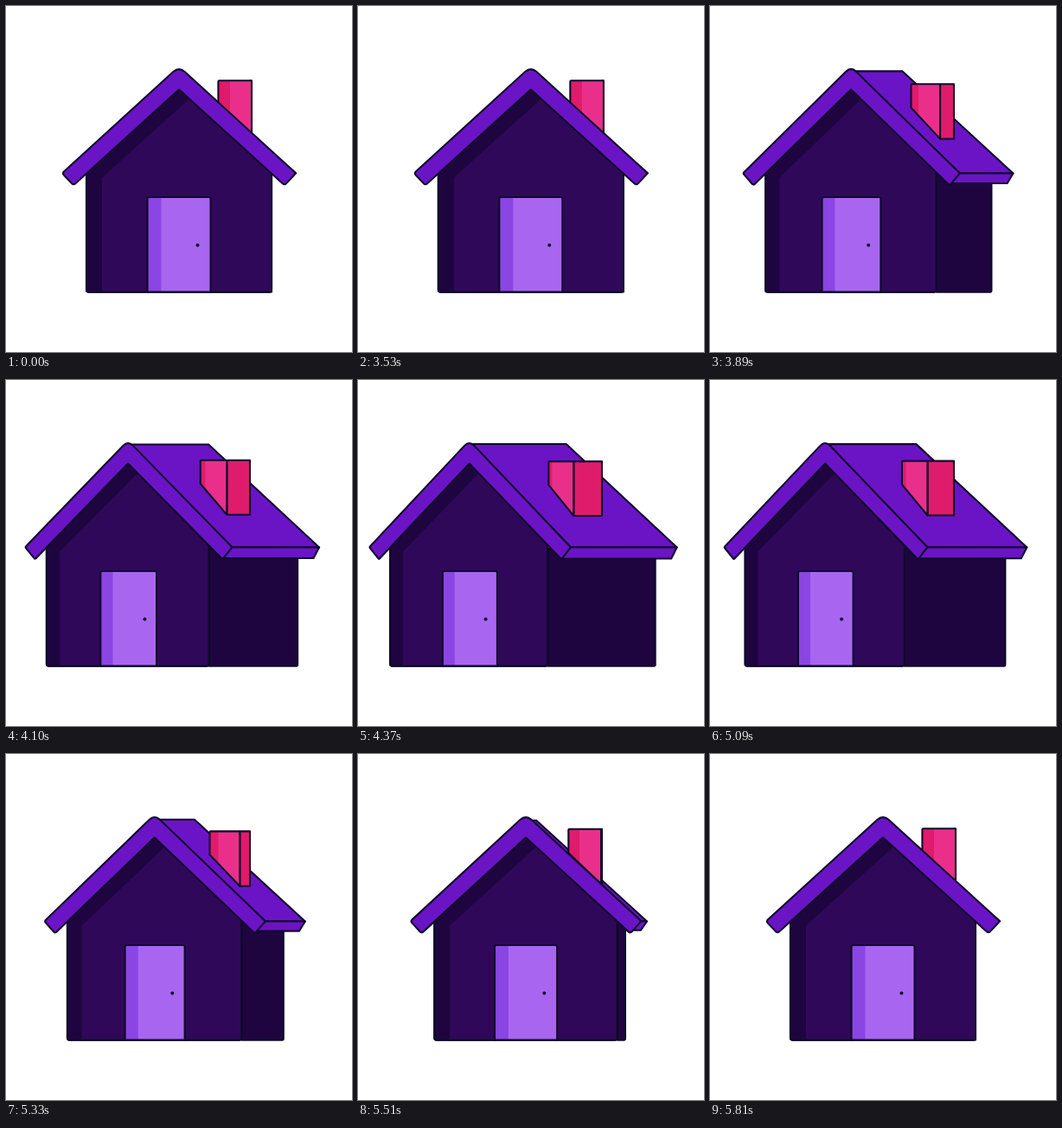
An HTML page for the animation above (5840 ms loop, 400x400 px).

```html
<!DOCTYPE html>
<html lang="en">
<head>
<meta charset="utf-8">
<title>House</title>
<style>
  html, body { margin: 0; width: 100%; height: 100%; overflow: hidden; background: #fff; }
  svg { display: block; width: 100vw; height: 100vh; }
  .line { stroke: #100a2c; stroke-width: 2.1; stroke-linejoin: round; }
</style>
</head>
<body>
<svg id="stage" viewBox="0 0 400 400"></svg>
<script>
const LOOP = 5840, OPEN = 3500, CLOSE = 4670, TURN = 1170;
const INK = '#100a2c', SHADE = '#1f0540', WALL = '#30085a', ROOF = '#6b14c6';
const DOOR = '#a866f0', DOOR_SHADE = '#8b45e3', BRICK = '#ea2f8b', BRICK_SHADE = '#df1c6b';
const stage = document.getElementById('stage');

function add(tag, attrs) {
  const el = document.createElementNS('http://www.w3.org/2000/svg', tag);
  for (const name in attrs) el.setAttribute(name, attrs[name]);
  return stage.appendChild(el);
}
const flat = fill => add('path', { fill });
const inked = fill => add('path', { fill, class: 'line' });

// Painted from back to front
const sideWall = inked(SHADE);
const wall = inked(SHADE);
const face = flat(WALL);
const wallLine = inked('none');
const door = flat(DOOR);
const doorShade = flat(DOOR_SHADE);
const doorLine = inked('none');
const knob = add('circle', { r: 2, cy: 276.5, fill: INK });
const slope = inked(ROOF);
const fascia = inked(ROOF);
const chimneySide = inked(BRICK_SHADE);
const chimney = flat(BRICK);
const chimneyShade = flat(BRICK_SHADE);
const chimneyLine = inked('none');
const gable = inked(ROOF);

// The point at distance r from a on the way to b
function toward([ax, ay], [bx, by], r) {
  const k = r / (Math.hypot(bx - ax, by - ay) || 1);
  return [ax + (bx - ax) * k, ay + (by - ay) * k];
}

// Closed polygon; each point is [x, y] or [x, y, corner size]
function draw(el, ...points) {
  const n = points.length;
  const parts = points.map((p, i) => {
    const [x, y, r = 0] = p;
    const a = toward(p, points[(i + n - 1) % n], r);
    const b = toward(p, points[(i + 1) % n], r);
    return `${a}Q${x},${y} ${b}`;
  });
  el.setAttribute('d', 'M' + parts.join('L') + 'Z');
}

// Timing curve with handles (a, 0) and (b, 1)
function ease(u, a, b) {
  let lo = 0, hi = 1;
  for (let i = 0; i < 30; i++) {
    const s = (lo + hi) / 2, r = 1 - s;
    if (3 * a * s * r * r + 3 * b * s * s * r + s * s * s < u) lo = s; else hi = s;
  }
  return lo * lo * (3 - 2 * lo);
}

function turnAt(ms) {
  if (ms < OPEN) return 0;
  if (ms < CLOSE) return ease((ms - OPEN) / TURN, 0.325, 0.24);
  return 1 - ease((ms - CLOSE) / TURN, 0.85, 0.255);
}

function render(ms) {
  const turn = turnAt(ms);
  const mix = (from, to) => from + (to - from) * turn;

  const left = mix(93, 34.5), right = mix(307, 215), back = mix(305.8, 345.5);
  const apex = mix(200, 125.2), base = 330.6;
  draw(sideWall, [right, 195], [back, 195], [back, base, 1], [right, base]);
  const outline = [[left, base, 2], [left, 188], [apex, 92], [right, 188], [right, base, 2]];
  draw(wall, ...outline);
  draw(wallLine, ...outline);
  const strip = mix(111, 49);
  draw(face, [strip, base], [strip, 198.6], [mix(212, 136.6), 107.6], [right, 193], [right, base, 2]);

  const doorL = mix(163.5, 94.7), doorR = mix(236.5, 157.3), doorM = mix(179.5, 108.4);
  const doorBox = (l, r, round) => [[l, 221, 2], [r, 221, round], [r, base], [l, base]];
  draw(door, ...doorBox(doorL, doorR, 2));
  draw(doorShade, ...doorBox(doorL, doorM, 0));
  draw(doorLine, ...doorBox(doorL, doorR, 2));
  knob.setAttribute('cx', mix(221.5, 144));

  const eave = [mix(335.1, 241.6), 193.3], tip = [mix(322, 231), 207.3];
  const eaveBack = [mix(330.9, 370.5), 193.5], ridgeY = mix(77, 73.8);
  const fasciaY = mix(203.5, 206.6);
  draw(slope, [apex + 2, ridgeY], [mix(203, 242.5), ridgeY], eaveBack, eave);
  draw(fascia, eave, eaveBack, [mix(323.8, 364), fasciaY], [tip[0], fasciaY]);

  const stackL = mix(245.4, 219.2), stackR = mix(284, 247.6), stackM = mix(259, 222.7);
  const top = mix(86.2, 94.5), lowL = mix(113.5, 121.7), lowR = mix(150, 157.3);
  const lowM = lowL + (lowR - lowL) * (stackM - stackL) / (stackR - stackL);
  draw(chimneySide, [stackR, top], [282, top], [282, lowR], [stackR, lowR]);
  const stack = [[stackL, top, 1], [stackR, top, 1], [stackR, lowR], [stackL, lowL]];
  draw(chimney, ...stack);
  draw(chimneyShade, [stackL, top, 1], [stackM, top], [stackM, lowM], [stackL, lowL]);
  draw(chimneyLine, ...stack);

  const round = mix(3, 1);
  draw(gable,
    [mix(64.9, 10.6), 193.3, round], [apex, 70, mix(9, 8)],
    [...eave, round], [...tip, round],
    [apex, 96.6], [mix(78, 21.6), 207.3, round]);
}

const start = performance.now();
function tick() {
  render((performance.now() - start) % LOOP);
  requestAnimationFrame(tick);
}
tick();
</script>
</body>
</html>
```
